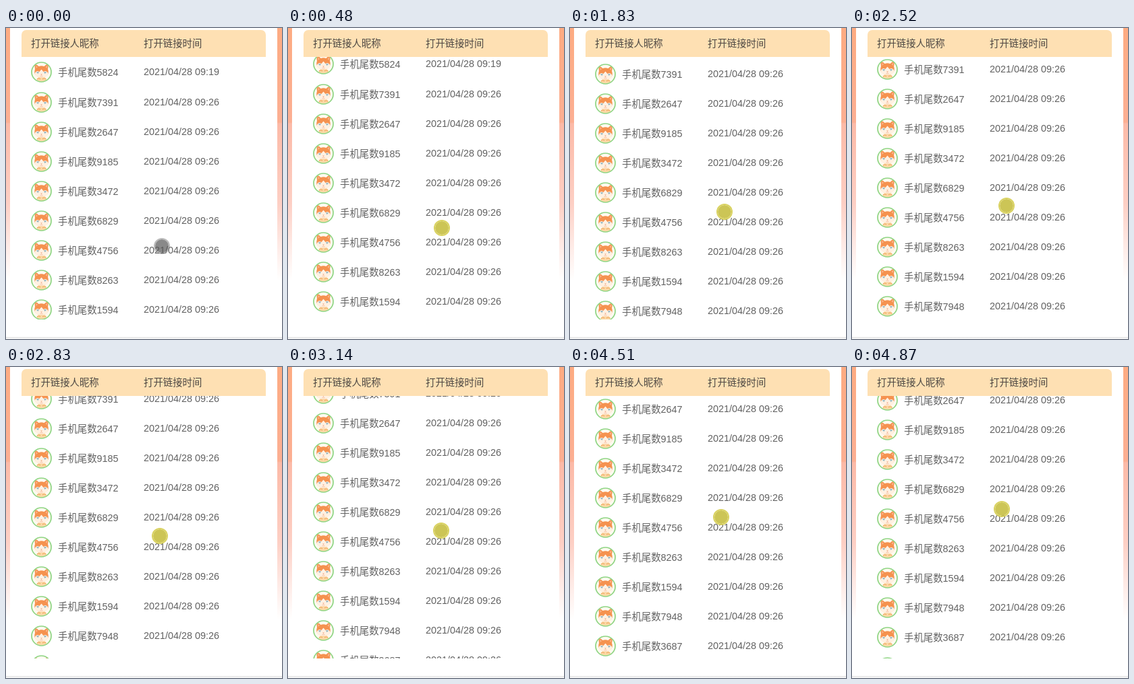
Animation of 409x462 px, one loop 5.04 s. Source, as an HTML page:

```html
<!DOCTYPE html>
<html lang="zh-CN">
<head>
<meta charset="utf-8">
<style>
  html, body { margin: 0; width: 100%; height: 100%; overflow: hidden; }
  body {
    position: relative;
    font: 14.4px "Liberation Sans", "Noto Sans CJK SC", "Noto Sans CJK", sans-serif;
    color: #626262;
    background: linear-gradient(#fdab82, #fcaf93 140px, #fcbaa7 142px, #fdcfc4 260px, #fee9e4 320px, #fff 375px);
  }
  .card, .head, .view, .row, .row *, .head span, #dot { position: absolute; }
  .card { left: 6px; top: 0; width: 396px; height: 459px; background: #fff; }
  .floor { position: absolute; left: 0; top: 459px; width: 409px; height: 3px; background: linear-gradient(#e4e4e4 1px, #f0f0f0 1px, #fafafa); }
  .head {
    left: 23px; top: 3px; width: 362px; height: 40px; line-height: 40px;
    background: #fee0b3; border-radius: 7px 7px 0 0; color: #4d4843;
  }
  .head span { white-space: nowrap; }
  .view { left: 23px; top: 43px; width: 362px; height: 390px; overflow: hidden; }
  #list { position: absolute; left: 0; top: 0; }
  .row { left: 0; width: 362px; height: 44.1px; line-height: 44.1px; white-space: nowrap; }
  .row svg { left: 14px; top: 7px; width: 31px; height: 31px; }
  .row .name { left: 54px; top: 1px; }
  .row .time { left: 181px; top: 0; }
  #dot {
    left: -12px; top: -12px; width: 24px; height: 24px; box-sizing: border-box;
    border: 2.5px solid rgba(120, 120, 120, .5); border-radius: 50%;
    background: rgba(88, 88, 88, .7); background-clip: padding-box;
  }
  #dot.down { border-color: rgba(214, 207, 84, .92); background-color: rgba(201, 193, 74, .93); }
</style>
</head>
<body>
<svg width="0" height="0" style="position:absolute">
  <symbol id="cat" viewBox="0 0 31 31">
    <clipPath id="disc"><circle cx="15.5" cy="15.5" r="14.2"/></clipPath>
    <circle cx="15.5" cy="15.5" r="14.5" fill="#fffaf0"/>
    <g clip-path="url(#disc)">
      <path d="M8 31Q8 22 15.500 22Q24 22 24 31Z" fill="#fbd9a6"/>
      <path d="M6 4Q9 4 11.500 7Q15.500 5.500 19.500 7Q22.500 3.500 25.500 3.500Q26 8 25 11Q27 17 23.500 21Q15.500 26 7.500 21Q4 17 6 11Q5 7 6 4Z" fill="#f5924f"/>
      <path d="M7.300 6Q9 6.500 10 8L7.500 10ZM24.200 5.500Q22.500 6.500 21.500 8L24 10Z" fill="#f8b48a"/>
      <path d="M5.800 17Q8 12.500 12.500 15L15.500 11.500L18.500 15Q23 12.500 25.300 17Q25 21 22.500 22Q15.500 25 8.500 22Q6 21 5.800 17Z" fill="#fff1e2"/>
      <path d="M7.500 15.500L12 15L10.500 18ZM23.500 15.500L19 15L20.500 18Z" fill="#8fb4c2"/>
      <path d="M14 18.500H17L15.500 20ZM12.500 21.500Q15.500 20 18.500 21.500" fill="#ef9d77"/>
      <path d="M9 26Q12 24 14 26M17 26Q19.500 24 22 26" fill="none" stroke="#f0a45e" stroke-width="1.2"/>
    </g>
    <circle cx="15.5" cy="15.5" r="14.5" fill="none" stroke="#8ed583" stroke-width="1.700"/>
  </symbol>
</svg>
<div class="card"></div>
<div class="floor"></div>
<div class="head"><span style="left:14px">打开链接人昵称</span><span style="left:181px">打开链接时间</span></div>
<div class="view"><div id="list"></div></div>
<div id="dot"></div>
<script>
  const LOOP = 5040, PITCH = 44.1;
  const tails = "5824 7391 2647 9185 3472 6829 4756 8263 1594 7948 3687 6215".split(" ");
  const list = document.getElementById("list");
  const dot = document.getElementById("dot");

  list.innerHTML = tails.map((tail, i) => `
    <div class="row" style="top:${(i * PITCH + 0.4).toFixed(1)}px">
      <svg><use href="#cat"/></svg>
      <span class="name">手机尾数${tail}</span>
      <span class="time">2021/04/28 09:${i ? 26 : 19}</span>
    </div>`).join("");

  // Each drag: start, end, number of jumps, then final scroll, pointer x, pointer y
  const rest = [0, 231, 324];
  const drags = [
    [40, 540, 15, 14, 227.5, 293],
    [570, 670, 3, 17, 228, 292],
    [840, 1310, 14, 37, 229, 279],
    [1480, 1970, 10, 44, 229, 270],
    [2040, 2200, 5, 47, 229, 266.5],
    [2460, 2980, 18, 69, 227.5, 245],
    [3010, 3500, 12, 77, 226, 237],
    [3570, 4090, 11, 86, 224.5, 228],
    [4190, 4310, 5, 91, 224, 224],
    [4510, 4870, 13, 105, 222, 211]
  ];

  function poseAt(t) {
    let pose = rest;
    for (const [start, end, jumps, ...goal] of drags) {
      if (t < start) break;
      const done = Math.floor((t - start) / (end - start) * (jumps - 1) + 1e-6) + 1;
      const p = Math.min(1, done / jumps);
      pose = pose.map((v, i) => v + (goal[i] - v) * p);
    }
    return pose;
  }

  function draw(now) {
    const t = now % LOOP;
    const [scroll, x, y] = poseAt(t).map(Math.round);
    list.style.transform = `translateY(${-scroll}px)`;
    dot.style.transform = `translate(${x}px, ${y}px)`;
    dot.classList.toggle("down", t >= drags[0][0]);
  }

  const begin = performance.now();
  function tick() {
    draw(performance.now() - begin);
    requestAnimationFrame(tick);
  }
  tick();
</script>
</body>
</html>
```
